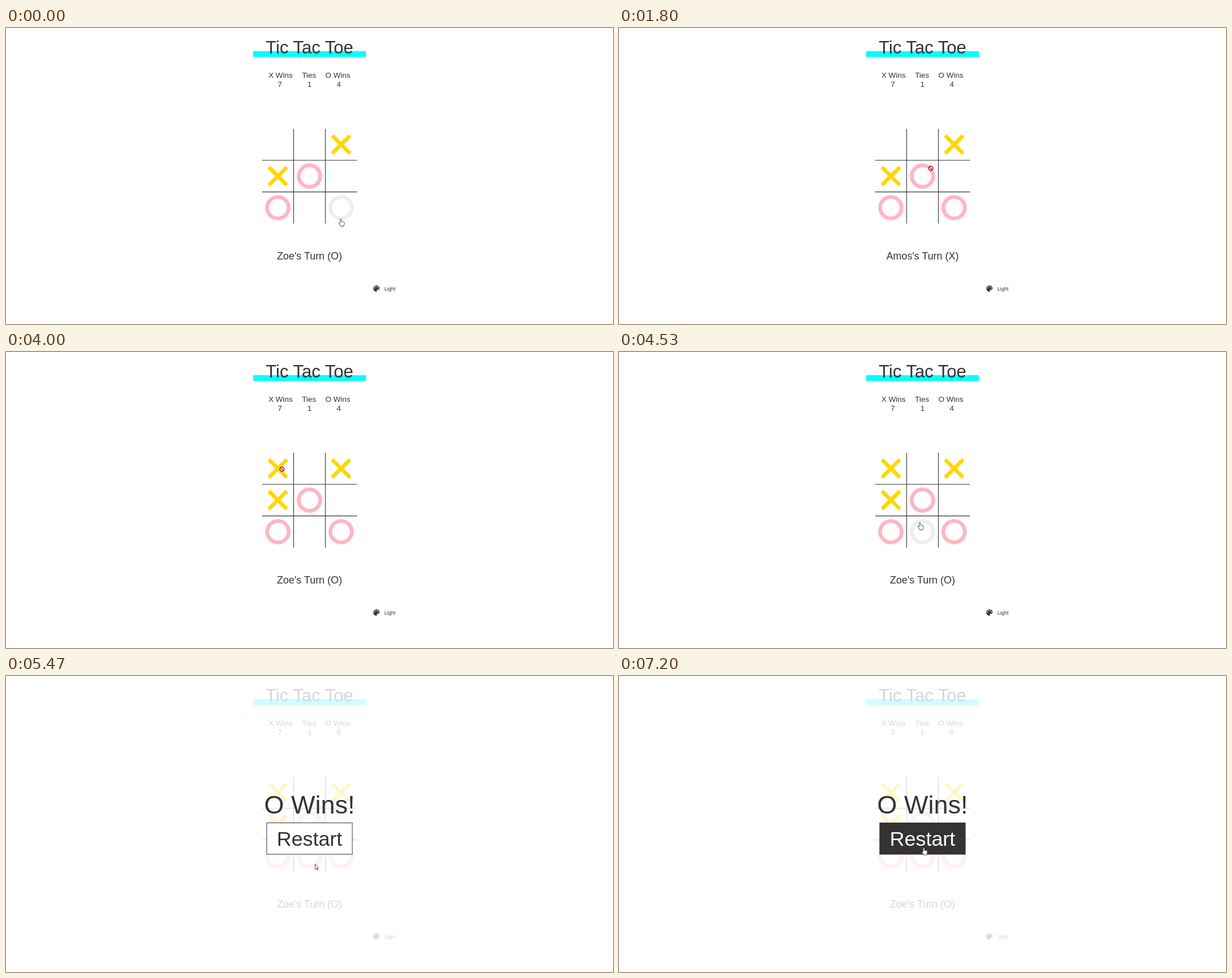
Recreate the animation shown at these times as an HTML page. Size 1071 by 523 pixels, loop 8000 ms.

```html
<!DOCTYPE html>
<html lang="en">
<head>
<meta charset="utf-8">
<title>Tic Tac Toe</title>
<style>
  html, body { margin: 0; width: 100%; height: 100%; overflow: hidden; background: #fff; }
  svg { display: block; font-family: Arial, "Liberation Sans", sans-serif; }
  text { fill: #333; }
  .mid { text-anchor: middle; }
  .small { font-size: 13.4px; }
  .cursor { fill: #fff; stroke: #222; stroke-width: .8; stroke-linejoin: round; }
</style>
</head>
<body>
<svg width="1071" height="523" viewBox="0 0 1071 523">
  <defs>
    <path id="X" d="M-15.8-15.8L15.8 15.8M15.8-15.8L-15.8 15.8" fill="none" stroke-width="6.7"/>
    <circle id="O" r="19" fill="none" stroke-width="6.7"/>
    <path id="arrow" class="cursor" d="M.4.5V9.8L2.5 7.9L4 11L5.4 10.4L4 7.3H6.8Z"/>
    <path id="hand" class="cursor" d="M-1.4 8V1.5a1.2 1.2 0 0 1 2.4 0V5q1-.5 1.9.2 1-.3 1.8.4 1.3-.1 1.3 1.3V9.5q0 1-1 2.5V13.2H-.8V12L-3.6 8.6q-.4-1.5.9-1.5Z"/>
    <g id="no" fill="#fff" stroke="#b8061c" stroke-width="1.5">
      <circle r="3.8"/><path d="M-2.7-2.7L2.7 2.7"/>
    </g>
  </defs>

  <g id="game">
    <path fill="#0ff" d="M436 41H635V51.3H436Z"/>
    <text class="mid" x="535.5" y="45" font-size="31">Tic Tac Toe</text>
    <g class="small">
      <text x="463.2" y="88.3">X Wins</text>
      <text x="522.3" y="88.3">Ties</text>
      <text x="563.6" y="88.3">O Wins</text>
      <text class="mid" x="483.3" y="104">7</text>
      <text class="mid" x="535.4" y="104">1</text>
      <text class="mid" x="587.3" y="104" id="oWins"></text>
    </g>
    <path d="M507.5 178V345.5M563.5 178V345.5M452 233.7H619.3M452 289.6H619.3" stroke="#333" stroke-width="1.1"/>
    <g id="marks"></g>
    <text class="mid" x="535.5" y="408.5" font-size="17.9" id="status"></text>
    <g transform="translate(646.1 452.9) scale(.62)">
      <path fill="#333" d="M12 3a9 9 0 0 0 0 18c.83 0 1.5-.67 1.5-1.5 0-.39-.15-.74-.39-1-.23-.27-.38-.62-.38-1 0-.83.67-1.5 1.5-1.5H16c2.76 0 5-2.24 5-5 0-4.42-4.03-8-9-8Z"/>
      <path stroke="#fff" stroke-width="3" stroke-linecap="round" d="M6.5 10.5h0M9.5 6.5h0M14.5 6.5h0M17.5 10.5h0"/>
    </g>
    <text x="667.8" y="463.5" font-size="8.93">Light</text>
  </g>

  <g id="result" class="mid">
    <text x="535.5" y="243" font-size="45">O Wins!</text>
    <rect id="button" x="460" y="259.5" width="151" height="55.5" stroke="#333"/>
    <text id="restart" x="535.5" y="300.2" font-size="35.8">Restart</text>
  </g>
  <use id="pointer"/>
</svg>
<script>
const LOOP = 8000, OVER = 5470, LEFT = 451.8, TOP = 178, CELL = 55.8;
const COLORS = { X: '#ffd700', O: '#ffb6c1' };
const $ = id => document.getElementById(id);

// Cell index, mark, time it is placed
const plays = [[2, 'X', 0], [3, 'X', 0], [4, 'O', 0], [6, 'O', 0], [8, 'O', 930], [0, 'X', 4000], [7, 'O', OVER]];

// Pointer strokes: start, end, steps, control point, end point
const strokes = [
  [670, 730, 2, 591, 332, 590, 326],
  [1600, 2070, 8, 585, 255, 489, 207],
  [2270, 2270, 1, 488, 207, 488, 207],
  [4000, 4000, 1, 487, 207, 487, 207],
  [4270, 4730, 8, 516, 270, 545, 332],
  [6670, 7000, 6, 543, 318, 538, 304],
  [7200, 7200, 1, 538, 303, 538, 303]
];

function pointerAt(t) {
  let x = 591, y = 337;
  for (const [start, end, steps, cx, cy, ex, ey] of strokes) {
    if (t < start) break;
    const gap = (end - start) / (steps - 1) || 1;
    const p = Math.min(1, (Math.floor((t - start) / gap + 1e-6) + 1) / steps);
    const e = 1 - (1 - p) ** 2;
    const curve = (a, b, c) => (1 - e) ** 2 * a + 2 * e * (1 - e) * b + e * e * c;
    x = curve(x, cx, ex);
    y = curve(y, cy, ey);
  }
  return [Math.round(x), Math.round(y)];
}

function mark(cell, kind, color) {
  const x = LEFT + CELL * (cell % 3 + .5), y = TOP + CELL * (Math.floor(cell / 3) + .5);
  return `<use href="#${kind}" x="${x}" y="${y}" stroke="${color}"/>`;
}

function draw(now) {
  const t = now % LOOP, over = t >= OVER;
  const [x, y] = pointerAt(t);
  const placed = plays.filter(play => t >= play[2]);
  const turn = t >= 930 && t < 4000 ? 'X' : 'O';
  const cell = Math.floor((x - LEFT) / CELL) + 3 * Math.floor((y - TOP) / CELL);
  const taken = placed.some(play => play[0] === cell);
  const hover = over && y < 316;

  let marks = placed.map(([c, kind]) => mark(c, kind, COLORS[kind])).join('');
  if (!taken && !over) marks += mark(cell, turn, '#eee');
  $('marks').innerHTML = marks;
  $('status').textContent = turn === 'X' ? "Amos's Turn (X)" : "Zoe's Turn (O)";
  $('oWins').textContent = over ? 5 : 4;

  $('game').setAttribute('opacity', over ? .2 : 1);
  $('result').style.display = over ? '' : 'none';
  $('button').style.fill = hover ? '#333' : '#fff';
  $('restart').style.fill = hover ? '#fff' : '#333';

  let shape = 'hand';
  if (t >= 5330) shape = hover ? 'hand' : 'arrow';
  else if (taken && !(t >= 930 && t < 1000)) shape = 'no';
  $('pointer').setAttribute('href', '#' + shape);
  $('pointer').setAttribute('transform', `translate(${x} ${y})`);
}

const began = performance.now();
function tick() {
  draw(performance.now() - began);
  requestAnimationFrame(tick);
}
tick();
</script>
</body>
</html>
```
